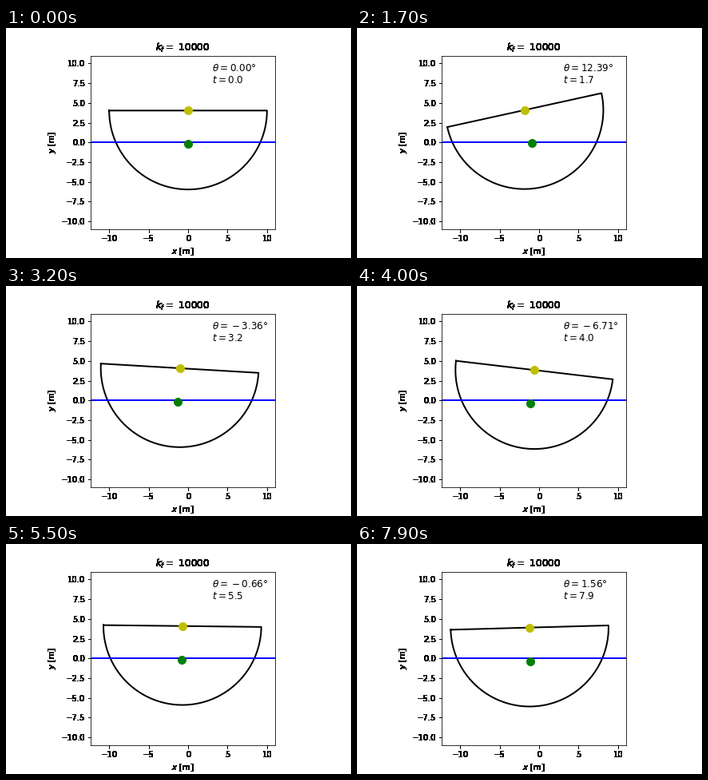
Write a matplotlib script that moves like this. It is 432x288 px and loops after 8000 ms.

```python
import numpy as np
import matplotlib.pyplot as plt
from matplotlib.animation import FuncAnimation

plt.rcParams.update({"font.family": "DejaVu Sans", "font.size": 10})

# Half-disc ship in still water (SI units)
R = 10.0
SIGMA, SIGMA_W = 500.0, 1000.0
G = 9.81
KF = 10000
OMEGA0 = 0.4
H = 4 * R / (3 * np.pi)              # mass centre below deck centre
M = SIGMA * np.pi * R**2 / 2
INERTIA = M * R**2 / 2 * (1 - 32 / (9 * np.pi**2))

FRAMES, STEP, SUB = 80, 0.1, 10


def rest_sector():
    """Sector angle of the submerged part when floating at rest."""
    gamma = 2.0
    for _ in range(30):
        f = gamma - np.sin(gamma) - np.pi * SIGMA / SIGMA_W
        gamma -= f / (1 - np.cos(gamma))
    return gamma


def rates(s):
    x, y, theta, vx, vy, omega = s
    gamma = 2 * np.arccos((y + H * np.cos(theta)) / R)
    lift = SIGMA_W * G * R**2 / 2 * (gamma - np.sin(gamma))
    drag = -KF * R * gamma * omega
    torque = -lift * H * np.sin(theta) + drag * (R - H * np.cos(theta))
    return np.array([vx, vy, omega, drag / M, lift / M - G, torque / INERTIA])


def rk4(s, dt):
    a = rates(s)
    b = rates(s + dt / 2 * a)
    c = rates(s + dt / 2 * b)
    d = rates(s + dt * c)
    return s + dt / 6 * (a + 2 * b + 2 * c + d)


def simulate():
    s = np.array([0, R * np.cos(rest_sector() / 2) - H, 0, 0, 0, OMEGA0])
    states = [s]
    for _ in range(FRAMES - 1):
        for _ in range(SUB):
            s = rk4(s, STEP / SUB)
        states.append(s)
    return np.array(states)


def solid(img, dpi):
    """Turn every touched pixel fully black for crisp, heavy lettering."""
    out = np.zeros_like(img)
    out[..., 3] = img[..., 3] > 0
    return out, 0, 0


path = simulate()

fig, ax = plt.subplots(figsize=(6, 4), dpi=72, facecolor="white")
fig.subplots_adjust(left=0.125, right=0.9, bottom=0.125, top=0.88)
ax.set_aspect("equal")
ax.set_xlim(path[:, 0].min() - 1.1 * R, path[:, 0].max() + 1.1 * R)
ax.set_ylim(-1.1 * R, 1.1 * R)
ax.set_xticks(np.arange(-10, 11, 5))
ax.set_yticks(np.arange(-10, 11, 2.5))
ax.set_xlabel("$x$ [m]")
ax.set_ylabel("$y$ [m]")
ax.set_title(f"$k_f =$ {KF}", fontsize=12)
for part in (ax.title, ax.xaxis, ax.yaxis):
    part.set_agg_filter(solid)

hull, = ax.plot([], [], "k", lw=2)
ax.axhline(0, color="b", lw=2)
mass, = ax.plot([], [], "go", ms=10)
deck, = ax.plot([], [], "yo", ms=10)
angle_text = ax.text(3, 9, "", fontsize=12)
time_text = ax.text(3, 7.5, "", fontsize=12)

arc = np.append(np.linspace(np.pi, 2 * np.pi, 181), np.pi)


def update(i):
    x, y, theta = path[i, :3]
    cx, cy = x - H * np.sin(theta), y + H * np.cos(theta)
    hull.set_data(cx + R * np.cos(arc + theta), cy + R * np.sin(arc + theta))
    mass.set_data([x], [y])
    deck.set_data([cx], [cy])
    # the empty group keeps wide spacing around a minus sign
    angle_text.set_text(rf"$\theta = {{}}{np.degrees(theta):.2f}$°")
    time_text.set_text(f"$t = {i * STEP:.1f}$")
    return hull, mass, deck, angle_text, time_text


anim = FuncAnimation(fig, update, frames=FRAMES, interval=100, repeat=True)
plt.show()
```
